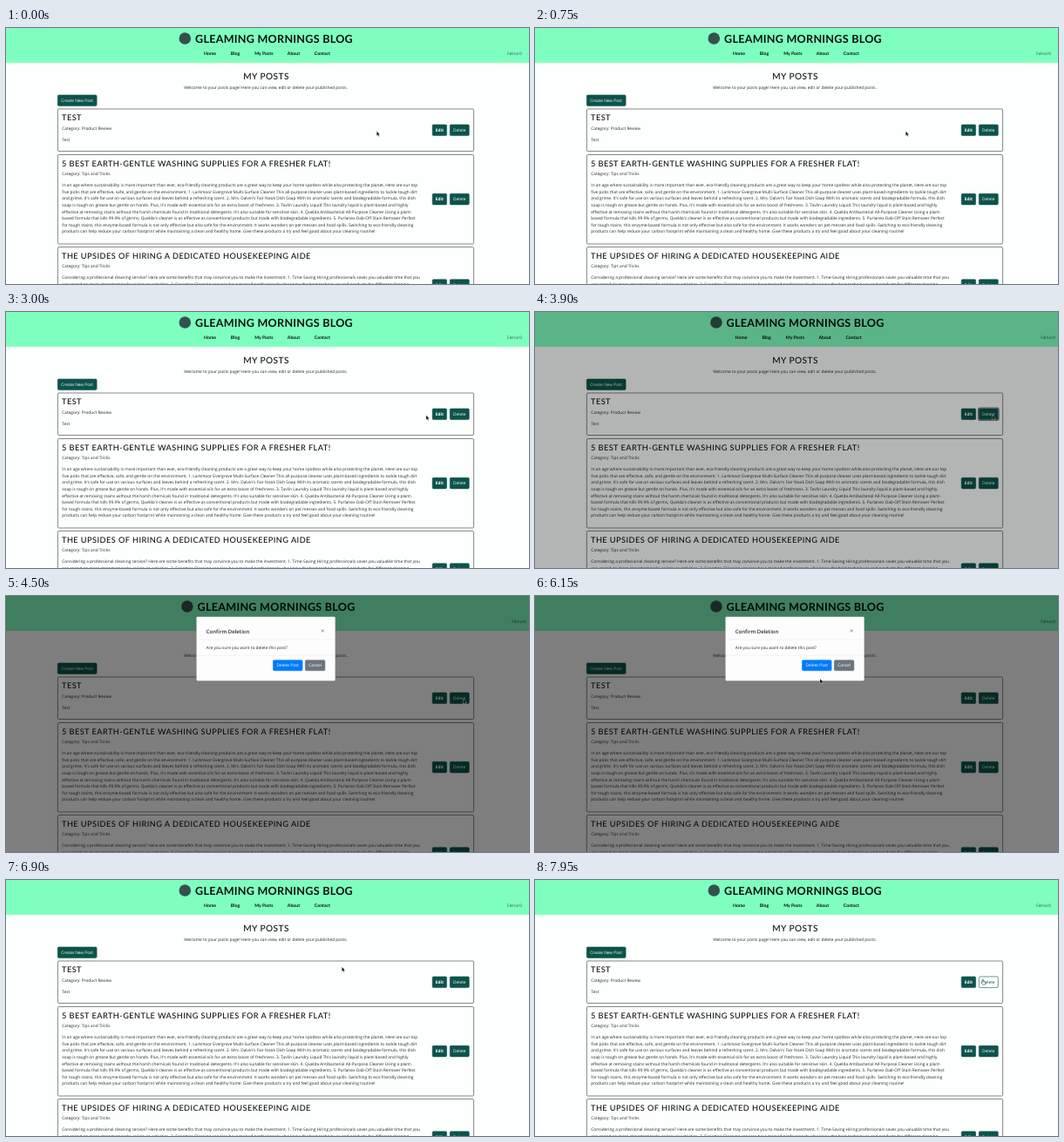
An HTML page for the animation above (8 s loop, 600 px wide and 294 px high).

```html
<!DOCTYPE html>
<html lang="en">
<head>
<meta charset="utf-8">
<title>My Posts</title>
<style>
html, body { margin: 0; width: 100%; height: 100%; overflow: hidden; background: #fdfefe; }
svg { display: block; width: 600px; height: 294px; }
text { font: 4.79px "Open Sans", "Noto Sans", sans-serif; fill: #24292b; text-rendering: geometricPrecision; white-space: pre; }
.brand { font: 700 12.6px Lato, sans-serif; letter-spacing: .25px; fill: #08100c; }
.nav { font: 700 5.2px Lato, sans-serif; fill: #08100c; }
.user { fill: #2f5d49; }
.page-title { font: 500 10.1px Lato, sans-serif; letter-spacing: .45px; fill: #111; }
.post-title { font: 500 9.2px Lato, sans-serif; letter-spacing: .44px; fill: #111; }
.mid { text-anchor: middle; }
.light { fill: #fff; }
.bold { font-weight: 700; }
.card { fill: none; stroke: #33383a; stroke-width: .6; }
.modal-title { font-size: 6px; font-weight: 600; }
</style>
</head>
<body>
<svg id="stage" viewBox="0 0 600 294" xmlns="http://www.w3.org/2000/svg"></svg>
<script>
const LOOP = 8000;
const TEAL = [12, 84, 75];
const WHITE = [255, 255, 255];
const LINE_HEIGHT = 7.6;

const posts = [
  { top: 93, height: 48.5, buttons: 111, title: "TEST", category: "Product Review", lines: ["Test"] },
  {
    top: 145.5, height: 102.5, buttons: 190.3,
    title: "5 BEST EARTH-GENTLE WASHING SUPPLIES FOR A FRESHER FLAT!",
    category: "Tips and Tricks",
    lines: [
      "In an age where sustainability is more important than ever, eco-friendly cleaning products are a great way to keep your home spotless while also protecting the planet, Here are our top",
      "five picks that are effective, safe, and gentle on the environment. 1. Larkmoor Evergrove Multi-Surface Cleaner This all-purpose cleaner uses plant-based ingredients to tackle tough dirt",
      "and grime. It's safe for use on various surfaces and leaves behind a refreshing scent. 2. Mrs. Dalvin's Fair Nook Dish Soap With its aromatic scents and biodegradable formula, this dish",
      "soap is tough on grease but gentle on hands. Plus, it's made with essential oils for an extra boost of freshness. 3. Tavlin Laundry Liquid This laundry liquid is plant-based and highly",
      "effective at removing stains without the harsh chemicals found in traditional detergents. It's also suitable for sensitive skin. 4. Quelda Antibacterial All-Purpose Cleaner Using a plant-",
      "based formula that kills 99.9% of germs, Quelda's cleaner is as effective as conventional products but made with biodegradable ingredients. 5. Purlanex Dab-Off Stain Remover Perfect",
      "for tough stains, this enzyme-based formula is not only effective but also safe for the environment. It works wonders on pet messes and food spills. Switching to eco-friendly cleaning",
      "products can help reduce your carbon footprint while maintaining a clean and healthy home. Give these products a try and feel good about your cleaning routine!"
    ]
  },
  {
    top: 251.5, height: 102, buttons: 288.8,
    title: "THE UPSIDES OF HIRING A DEDICATED HOUSEKEEPING AIDE",
    category: "Tips and Tricks",
    lines: [
      "Considering a professional cleaning service? Here are some benefits that may convince you to make the investment. 1. Time-Saving Hiring professionals saves you valuable time that you",
      "can spend on more important tasks or leisure activities. 2. Expertise Cleaning services have trained professionals who know the best techniques and products for different cleaning"
    ]
  }
];

const text = (x, y, content, cls = "", id = "") =>
  `<text x="${x}" y="${y}" class="${cls}" id="${id}">${content}</text>`;

const button = (x, y, w, h, label, fill, cls = "", id = "") =>
  `<g id="${id}"><rect x="${x}" y="${y}" width="${w}" height="${h}" rx="1.3" fill="${fill}" stroke="${fill}" stroke-width=".6"/>` +
  text(x + w / 2, y + h / 2 + 1.75, label, "mid light " + cls) + "</g>";

const teal = `rgb(${TEAL})`;

function postCard(post, i) {
  const { top, height, buttons, title, category, lines } = post;
  return `<rect class="card" x="59.4" y="${top}" width="477.2" height="${height}" rx="1.3"/>` +
    text(64, top + 13.4, title, "post-title") +
    text(64.3, top + 23.8, "Category: " + category) +
    lines.map((line, n) => text(64.3, top + 36.7 + n * LINE_HEIGHT, line)).join("") +
    button(489.2, buttons, 16.4, 12.6, "Edit", teal, "bold", "edit" + i) +
    button(509.3, buttons, 22, 12.6, "Delete", teal, "", "delete" + i);
}

const nav = [[227, "Home"], [257.8, "Blog"], [285.2, "My Posts"], [322.8, "About"], [353.8, "Contact"]];

document.getElementById("stage").innerHTML = `
  <rect width="600" height="294" fill="#fdfefe"/>
  <rect width="600" height="40" fill="#7fffbf"/>
  <g id="header">
    <circle cx="205.3" cy="12" r="6.8" fill="#35514b"/>
    ${text(217, 16.6, "GLEAMING MORNINGS BLOG", "brand")}
    ${nav.map(([x, label]) => text(x, 31.4, label, "nav")).join("")}
  </g>
  ${text(575, 31.3, "Felnor0", "user", "user")}
  ${text(298.5, 58.8, "MY POSTS", "page-title mid")}
  ${text(298, 69.5, "Welcome to your posts page! Here you can view, edit or delete your published posts.", "mid")}
  ${button(59.3, 77, 44.8, 12.4, "Create New Post", teal)}
  ${posts.map(postCard).join("")}
  <rect id="focus" x="508.5" y="110.2" width="23.6" height="14.2" rx="1.8" fill="none" stroke="#6f7f7c" stroke-width="1.2"/>
  <rect id="backdrop" width="600" height="294" fill="#000"/>
  <g id="modal">
    <rect x="218.4" y="23.8" width="159.4" height="73.6" rx="1.4" fill="#fdfdfd" stroke="#444" stroke-opacity=".4" stroke-width=".4"/>
    ${text(229.8, 42.8, "Confirm Deletion", "modal-title")}
    <path d="M361.8 38.4l3 3m0-3l-3 3" stroke="#777" stroke-width=".8"/>
    <path d="M218.6 50.2h159M218.6 68.2h159" stroke="#e4e7ea" stroke-width=".5"/>
    ${text(229.8, 61.2, "Are you sure you want to delete this post?")}
    ${button(306.5, 73.7, 33.6, 12, "Delete Post", "#007bff")}
    ${button(343.3, 73.7, 22.6, 12, "Cancel", "#6c757d")}
  </g>
  <path id="arrow" d="M0 0v5.3l1.2-1 .8 1.8 .9-.4-.8-1.7h1.6z" fill="#000" stroke="#fff" stroke-width=".3"/>
  <path id="hand" d="M-.6 .3q.6-.7 1.1 0v2.1l2 .4q.8.2.7 1l-.5 2.3h-2.9l-1.7-2.3q.1-.7.8-.4l.5.4z" fill="#fff" stroke="#111" stroke-width=".5"/>`;

const el = id => document.getElementById(id);
const ramp = (t, start, length) => Math.min(1, Math.max(0, (t - start) / length));
const smooth = p => p * p * (3 - 2 * p);
const easeOut = p => 1 - (1 - p) ** 2;
const mix = (a, b, p) => `rgb(${a.map((v, i) => Math.round(v + (b[i] - v) * p))})`;
const between = (t, from, to) => t >= from && t < to;
const hover = (t, from, to) => ramp(t, from, 120) * (1 - ramp(t, to, 120));
const move = (id, x, y) => el(id).setAttribute("transform", `translate(${x} ${y})`);
const setOpacity = (id, value) => el(id).setAttribute("opacity", value);

const PRESS = 3740, OPEN = 3813, CLOSE = 6449;
const SHOW = OPEN + 150, HIDDEN = CLOSE + 300;

// time, x, y of the pointer tip
const path = [
  [0, 425.3, 118.5], [2700, 425.3, 118.5], [3250, 524.6, 118.5], [5000, 524.6, 118.5],
  [5900, 327, 95], [6300, 327, 95], [6400, 354, 79.5], [6480, 354, 79.5],
  [6750, 355, 96], [6800, 355, 96], [7100, 470, 110], [7750, 470, 110],
  [7860, 513.7, 114], [LOOP, 513.7, 114]
];

function pointerAt(t) {
  const i = path.findIndex(key => key[0] > t);
  const [t0, x0, y0] = path[i - 1], [t1, x1, y1] = path[i];
  const p = smooth(ramp(t, t0, t1 - t0));
  return [x0 + (x1 - x0) * p, y0 + (y1 - y0) * p];
}

function paintHover(id, amount) {
  const [rect, label] = el(id).children;
  rect.setAttribute("fill", mix(TEAL, WHITE, amount));
  label.style.fill = mix(WHITE, TEAL, amount);
}

function render(t) {
  const shifted = between(t, OPEN, HIDDEN + 150);
  move("header", shifted ? 2.6 : 0, 0);
  move("user", shifted ? 5.2 : 0, 0);

  const dim = ramp(t, OPEN, 150) * (1 - ramp(t, HIDDEN, 150));
  setOpacity("backdrop", .5 * dim);

  const slide = easeOut(ramp(t, SHOW, 300)) - easeOut(ramp(t, CLOSE, 300));
  move("modal", 0, -16 * (1 - slide));
  setOpacity("modal", ramp(t, SHOW, 150) * (1 - ramp(t, CLOSE, 150)));

  paintHover("edit0", hover(t, 7800, 7825));
  paintHover("delete0", Math.max(hover(t, 3120, PRESS), hover(t, 7828, LOOP)));
  setOpacity("focus", ramp(t, PRESS, 100) * (1 - ramp(t, SHOW + 150, 150)));

  const [x, y] = pointerAt(t);
  const pointing = between(t, 3120, OPEN) || between(t, 6380, 6530) || t >= 7800;
  move("arrow", x, y);
  move("hand", x, y);
  setOpacity("arrow", pointing ? 0 : 1);
  setOpacity("hand", pointing ? 1 : 0);
}

const start = performance.now();
function tick() {
  render((performance.now() - start) % LOOP);
  requestAnimationFrame(tick);
}
tick();
</script>
</body>
</html>
```
